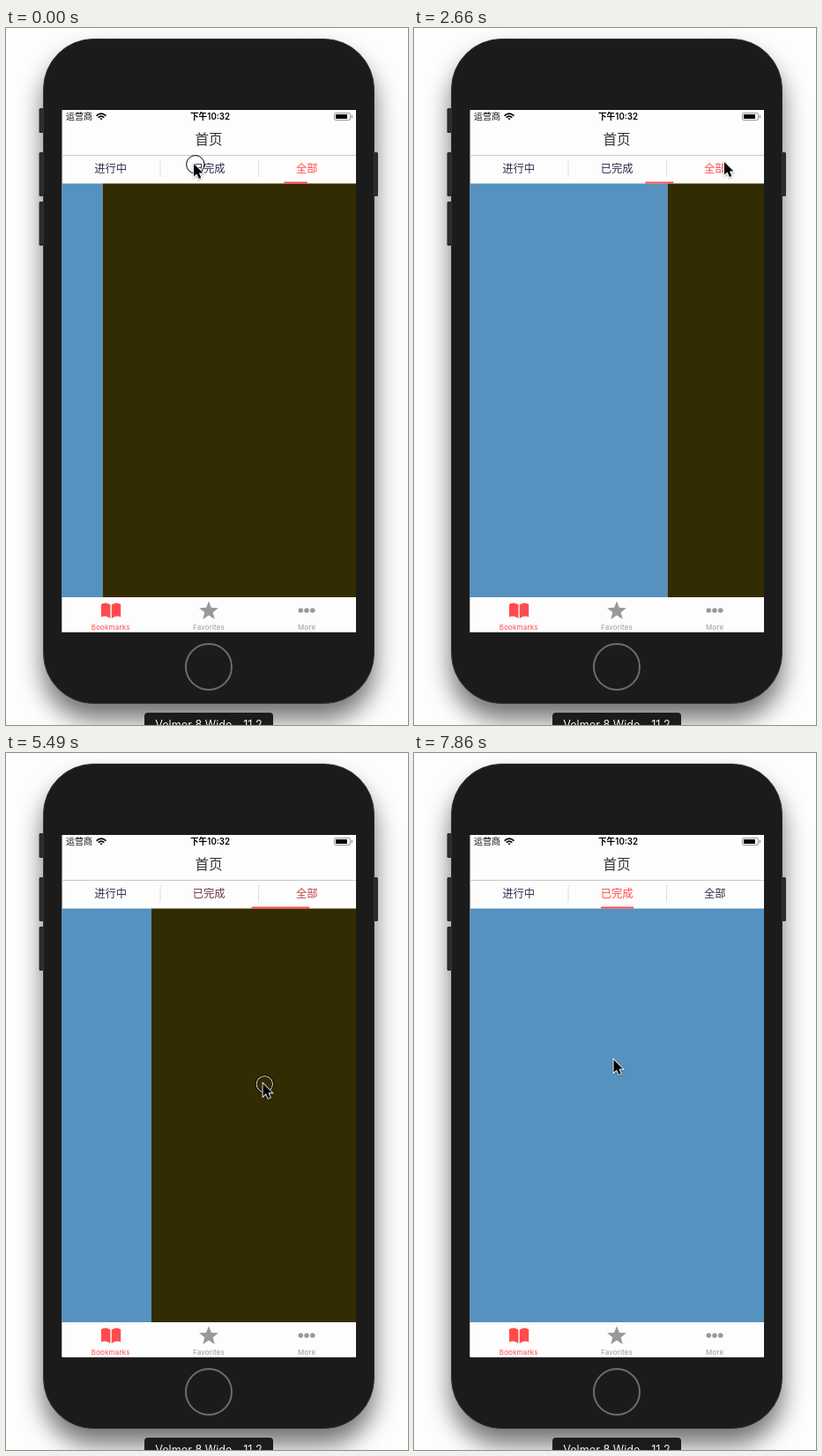
These frames come from a looping animation (456x791 px, 8 s). An HTML page:

```html
<!DOCTYPE html>
<html lang="zh-CN">
<head>
<meta charset="utf-8">
<title>Segmented pages</title>
<style>
html, body { margin: 0; width: 100%; height: 100%; overflow: hidden; background: #fdfdfd; }
svg { display: block; width: 456px; height: 791px; }
text { font-family: Inter, "Noto Sans CJK SC", "Noto Sans CJK", sans-serif; text-anchor: middle; fill: #333; }
.start { text-anchor: start; }
.title { font-size: 15.5px; }
.tab { font-size: 12.3px; }
.date { font-size: 11px; fill: #999; }
.date.on { font-size: 11.6px; fill: #444; }
.meal { font-size: 11.5px; fill: #444; font-weight: 500; }
.slot { font-size: 10.6px; fill: #555; }
.item { fill: #999; }
.item text { font-size: 8px; letter-spacing: .15px; fill: inherit; }
.item.on, .meal.on { fill: #ff4b4d; }
.rule { stroke: #dedede; }
</style>
</head>
<body>
<svg viewBox="0 0 456 791">
  <defs>
    <filter id="blur" x="-20%" y="-20%" width="140%" height="140%"><feGaussianBlur stdDeviation="14"/></filter>
    <filter id="soft" x="-50%" y="-50%" width="200%" height="200%"><feDropShadow dx="0" dy="1" stdDeviation="1" flood-opacity=".4"/></filter>
    <clipPath id="screen"><rect x="63.5" y="93" width="333.5" height="592.5"/></clipPath>
  </defs>

  <rect x="42" y="30" width="376" height="755" rx="58" opacity=".55" filter="url(#blur)"/>
  <g fill="#2b2b2b">
    <rect x="37.5" y="91" width="8" height="28" rx="1.5"/>
    <rect x="37.5" y="141" width="8" height="50" rx="1.5"/>
    <rect x="37.5" y="197" width="8" height="50" rx="1.5"/>
    <rect x="414" y="141" width="8" height="50" rx="1.5"/>
  </g>
  <rect x="42.5" y="12.5" width="375" height="754" rx="57" fill="#1b1b1b" stroke="#333"/>
  <circle cx="230" cy="725" r="26" fill="none" stroke="#6d6d6d" stroke-width="2"/>
  <rect x="157" y="777" width="146" height="24" rx="4" fill="#1b1b1b"/>
  <text x="230" y="795" font-size="12.6" style="fill:#f4f4f4">Velmor 8 Wide - 11.2</text>

  <g clip-path="url(#screen)">
    <rect x="63" y="93" width="335" height="593" fill="#fdfdfd"/>
    <text class="start" x="68" y="104" font-size="10" style="fill:#111">运营商</text>
    <g fill="none" stroke="#000" stroke-width="1.7">
      <path d="M102.6 99.6Q108 94.6 113.4 99.6M104.7 101.7Q108 98.7 111.3 101.7"/>
      <path d="M106.2 102.4H109.8L108 104.4Z" fill="#000" stroke="none"/>
    </g>
    <text x="231.5" y="104" font-size="9.7" font-weight="600" style="fill:#000">下午10:32</text>
    <rect x="372.5" y="96.5" width="18" height="8" rx="1.5" fill="none" stroke="#999"/>
    <rect x="374" y="98" width="13" height="5" fill="#000"/>
    <path d="M392.3 99V102" stroke="#777"/>

    <g id="home">
      <text class="title" x="230" y="131.5">首页</text>
      <g id="pages">
        <rect x="63.5" y="176.5" width="333.5" height="470" fill="#2e3054"/>
        <rect x="397" y="176.5" width="333.5" height="470" fill="#5592c0"/>
        <rect x="730.5" y="176.5" width="333.5" height="470" fill="#332c02"/>
      </g>
      <path class="rule" d="M175 150V169M286.5 150V169"/>
      <text class="tab" x="118.7" y="164">进行中</text>
      <text class="tab" x="230.2" y="164">已完成</text>
      <text class="tab" x="341.2" y="164">全部</text>
      <rect id="line" y="174.5" height="2" fill="#ff4b4d"/>
    </g>

    <g id="meals">
      <text class="title" x="230" y="131.5">用餐时间</text>
      <g id="dates"></g>
      <path d="M63 188H397" stroke="#d4d4d4"/>
      <path d="M87 188H136" stroke="#ff4b4d" stroke-width="1.5"/>
      <path class="rule" d="M175 197V216M286.5 197V216"/>
      <text class="meal on" x="126" y="210.3">早餐</text>
      <text class="meal" x="237" y="210.3">午餐</text>
      <text class="meal" x="348" y="210.3">晚餐</text>
      <rect x="63" y="225" width="335" height="390" fill="#f0f0f0"/>
      <g id="slots"></g>
      <rect x="63" y="614" width="335" height="32.5" fill="#ff4b4d"/>
      <text x="230" y="634.7" font-size="13" style="fill:#fff">确定</text>
    </g>

    <path d="M63 144.5H397" stroke="#c9c9c9"/>
    <rect x="63" y="646" width="335" height="40" fill="#fdfdfd"/>
    <g class="item">
      <path d="M118.4 654.6Q113 650.6 108 654V668.4Q113.6 665.8 118.4 670Z"/>
      <path d="M119.8 654.6Q125 650.6 130.2 654V668.4Q124.6 665.8 119.8 670Z"/>
      <text x="118.7" y="683">Bookmarks</text>
    </g>
    <g class="item">
      <path id="star"/>
      <text x="230" y="683">Favorites</text>
    </g>
    <g class="item">
      <circle cx="334.3" cy="661" r="2.8"/><circle cx="341" cy="661" r="2.8"/><circle cx="347.8" cy="661" r="2.8"/>
      <text x="341.2" y="683">More</text>
    </g>
  </g>

  <g id="cursor">
    <g id="ring" fill="none">
      <circle cx="1.8" cy=".8" r="9.3" stroke="#fff"/>
      <circle cx="1.8" cy=".8" r="10.2" stroke="#000"/>
    </g>
    <path d="M0 0V14.6L3.4 11.5L5.9 17L8.3 15.9L5.9 10.6H10.4Z" stroke="#fff" stroke-width="1.6" paint-order="stroke" filter="url(#soft)"/>
  </g>
</svg>
<script>
const LOOP = 8000, STEP = 148.5, LEAD = 14, WIDTH = 333.5;
const TAP_TIME = 2.61, SETTLE_TIME = 1.6;   // in steps
const RED = [255, 75, 77], INK = [48, 48, 76];
const LEFT = [100.5, 212, 329], RIGHT = [137.5, 249, 354];

// pointer path: step, x, y
const path = [
  [0, 213, 154], [1, 212, 154], [5, 122, 156], [7, 118, 155], [10, 170, 154],
  [12, 205.5, 152], [13, 210, 153], [15, 402, 156], [17, 354, 153], [18, 352, 152],
  [20, 340, 170], [24, 231, 658], [26, 231, 658], [30, 128, 668], [31, 125.5, 670],
  [32, 127, 668], [35, 190, 380], [36, 205, 378], [38, 378, 372], [40, 270, 370],
  [42, 195.5, 366], [43, 408, 358], [45, 224, 345], [47, 224, 344], [48, 200, 343],
  [49, 148.5, 340], [50, 70, 342], [51, 12, 345], [53, 226.5, 348]
];
const presses = [[0, 1], [5, 6], [12, 12], [17, 17], [24, 24], [31, 31], [35, 38], [42, 43], [47, 51]];
const taps = [[-2, 2], [1, 1], [6, 0], [12, 1], [17, 2]];          // step, page
const drags = [[35, 38, 2, 1], [42, 43, 1, 0], [47, 51, 0, 1]];    // press, release, from, to

const $ = id => document.getElementById(id);
const all = sel => [...document.querySelectorAll(sel)];
const mix = (a, b, p) => a + (b - a) * p;
const smooth = u => u * u * (3 - 2 * u);
const latest = (list, k) => list.filter(e => e[0] <= k).pop();

function pointer(k) {
  const i = Math.max(1, path.findIndex(p => p[0] >= k));
  const [a, b] = [path[i - 1], path[i]];
  const p = (k - a[0]) / (b[0] - a[0]);
  return [mix(a[1], b[1], p), mix(a[2], b[2], p)];
}

function tapState(k) {
  const [start, to] = latest(taps, k);
  const prev = latest(taps, start - 1);
  const from = prev ? prev[1] : 1;
  const p = smooth(Math.min(1, (k - start) / TAP_TIME));
  const q = p + .6 * p * (1 - p) ** 1.6;    // the line runs ahead of the page
  return {
    scroll: mix(from, to, p),
    left: mix(LEFT[from], LEFT[to], q),
    right: mix(RIGHT[from], RIGHT[to], q),
    weight: i => +(i === to)
  };
}

function dragState(k, [press, release, from, to]) {
  const moved = pointer(Math.min(k, release))[0] - pointer(press)[0];
  let scroll = from - moved / WIDTH;
  if (k > release) {
    const u = Math.min(1, (k - release) / SETTLE_TIME);
    scroll = mix(scroll, to, 1 - (1 - u) ** 2);
  }
  scroll = Math.min(2, Math.max(0, scroll));
  const i = Math.min(1, Math.floor(scroll)), p = scroll - i;
  return {
    scroll,
    left: mix(LEFT[i], LEFT[i + 1], p ** 1.55),
    right: mix(RIGHT[i], RIGHT[i + 1], 1 - (1 - p) ** 2),
    weight: n => Math.max(0, 1 - Math.abs(scroll - n))
  };
}

const tabs = all('.tab'), items = all('.item');

function draw(now) {
  const k = Math.floor((now % LOOP + LEAD) / STEP);
  const drag = latest(drags, k);
  const state = drag ? dragState(k, drag) : tapState(k);
  const [x, y] = pointer(k);
  const onMeals = k >= 25 && k < 32;

  $('pages').setAttribute('transform', `translate(${-state.scroll * WIDTH})`);
  $('line').setAttribute('x', state.left);
  $('line').setAttribute('width', state.right - state.left);
  tabs.forEach((tab, i) => {
    const w = state.weight(i);
    tab.style.fill = `rgb(${INK.map((c, n) => Math.round(mix(c, RED[n], w)))})`;
  });
  $('home').style.display = onMeals ? 'none' : '';
  $('meals').style.display = onMeals ? '' : 'none';
  items.forEach((item, i) => item.classList.toggle('on', i === +onMeals));
  $('cursor').setAttribute('transform', `translate(${x} ${y})`);
  $('ring').style.display = presses.some(([a, b]) => k >= a && k <= b) ? '' : 'none';
  requestAnimationFrame(draw);
}

$('dates').innerHTML = ['明天', '后天', 'Friday', 'Saturday', 'Sunday'].map((day, i) => {
  const attrs = `class="date${i ? '' : ' on'}" x="${111.5 + 72 * i}"`;
  return `<text ${attrs} y="163.3">${day}</text><text ${attrs} y="176.8">12月${20 + i}日</text>`;
}).join('');

$('slots').innerHTML = ['06:00', '06:30', '07:00', '07:30'].map((time, i) => {
  const x = 80 + 62.7 * i;
  return `<rect x="${x}" y="237" width="49.5" height="49.5" fill="#fdfdfd" stroke="#e2e2e2"/>
    <text class="slot" x="${x + 24.7}" y="265.6">${time}</text>`;
}).join('');

$('star').setAttribute('d', 'M' + Array.from({ length: 10 }, (_, i) => {
  const r = i % 2 ? 4.9 : 11.5, a = Math.PI * (i / 5 - .5);
  return [230 + r * Math.cos(a), 661.7 + r * Math.sin(a)].map(v => v.toFixed(2));
}).join('L') + 'Z');

draw(performance.now());
</script>
</body>
</html>
```
